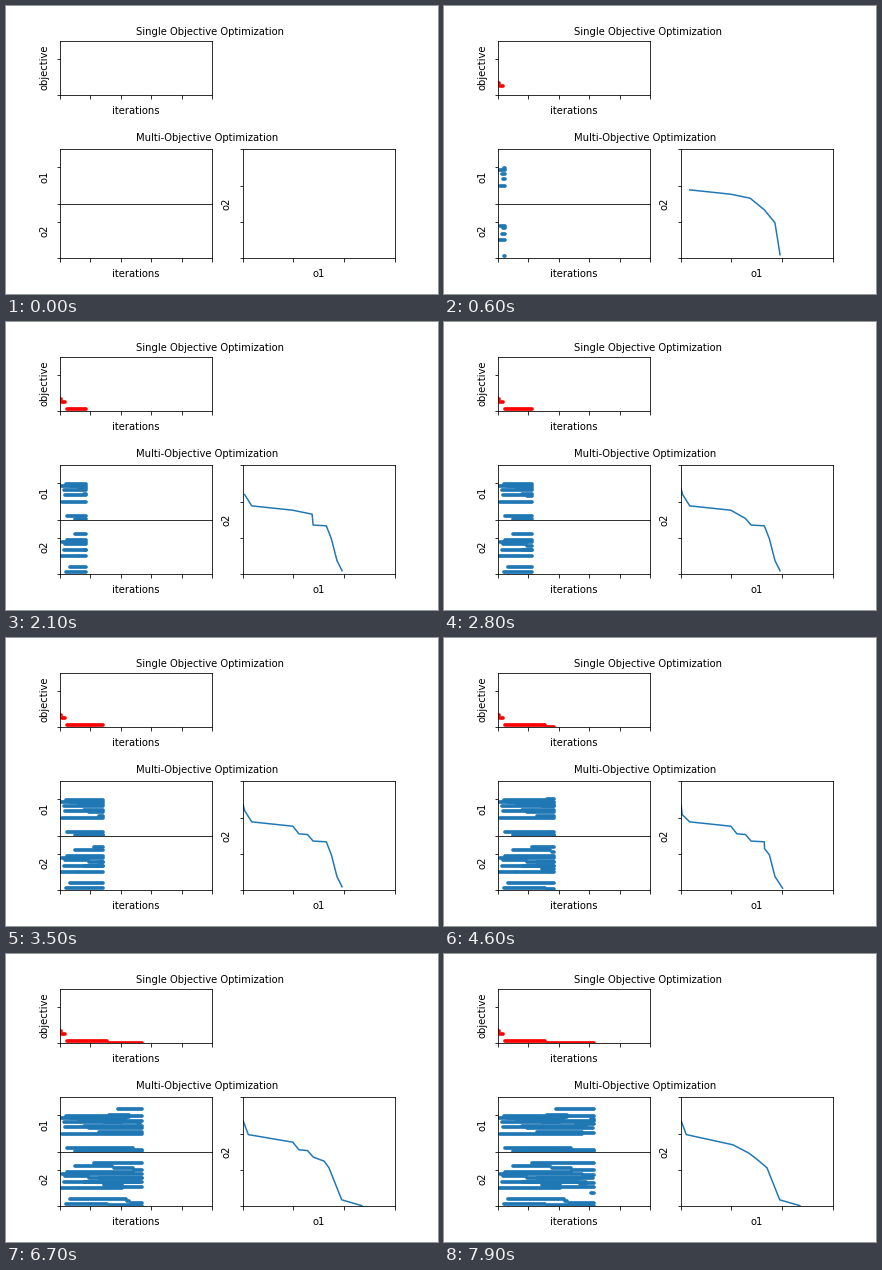
Write a matplotlib script that moves like this. It is 432 by 288 pixels and loops after 8 s.

```python
import matplotlib.pyplot as plt
from matplotlib.animation import FuncAnimation
from matplotlib.collections import LineCollection
import numpy as np

FRAMES = 80
STEPS = 125  # iterations spanned by the x axes
PAD = 11     # gap between an axis and its label, in pixels

# Key solutions (o1, o2) in order of discovery
KEYS = [(2.14, .64), (1.86, .97), (.99, 1.76), (1.65, 1.33), (1.37, 1.65),
        (1.96, .09), (.18, 1.88), (1.86, .37), (.04, 2.19), (1.75, .97),
        (1.39, 1.35), (1.28, 1.53), (.01, 2.35), (1.11, 1.55), (1.655, 1.14),
        (2.01, .05), (.03, 2.08), (2.35, .01)]
KEY_STEPS = np.r_[0:7, 8:50:4]
BLEND_STEPS = range(52, FRAMES, 3)

# Single objective: start of each level and its value
LEVELS = [(0, .67), (2, .5), (5, .2), (6, .11), (40, .02)]


def evolve(seed=4):
    """Rows (o1, o2, birth, death); a new solution displaces close ones."""
    rng = np.random.default_rng(seed)
    archive = []

    def add(point, step):
        radius = .16 + .3 / max(step, 1) ** 2
        for row in archive:
            if row[3] == FRAMES and np.hypot(*np.subtract(row[:2], point)) < radius:
                row[3] = step
        archive.append([*point, step, FRAMES])

    for point, step in zip(KEYS, KEY_STEPS):
        add(point, step)
    for step in BLEND_STEPS:
        alive = sorted(row[:2] for row in archive if row[3] == FRAMES)
        i = rng.integers(1, len(alive) - 2)
        mix = rng.uniform(.3, .7)
        add(mix * np.array(alive[i]) + (1 - mix) * np.array(alive[i + 1]), step)
    archive = np.array(archive)
    return archive[np.argsort(archive[:, 0])]


def bars(values, births, deaths, step):
    """Horizontal segments for everything that has appeared so far."""
    return [[(b, v), (min(step, d - 1) + .01, v)]
            for v, b, d in zip(values, births, deaths) if b <= step]


o1, o2, birth, death = evolve().T
level_starts, level_values = zip(*LEVELS)
level_ends = level_starts[1:] + (FRAMES,)

plt.rcParams.update({"font.family": "DejaVu Sans", "font.size": 10,
                     "text.kerning_factor": 6})
fig = plt.figure(figsize=(6, 4), dpi=72, facecolor="white")
fig.subplots_adjust(left=.125, right=.9, top=.88, bottom=.125)
grid = fig.add_gridspec(4, 2, hspace=0, wspace=.2)


def make_axes(cell, xmax, xticks, yticks, xlabel, ylabel):
    ax = fig.add_subplot(cell)
    ax.set(xlim=(0, xmax), ylim=(0, 3), xticks=xticks, yticks=yticks)
    ax.tick_params(labelbottom=False, labelleft=False)
    style = dict(xycoords="axes fraction", textcoords="offset points",
                 ha="center", annotation_clip=False)
    ax.annotate(xlabel, (.5, 0), (0, -PAD), va="top", **style)
    ax.annotate(ylabel, (0, .5), (-PAD, 0), va="bottom", rotation=90,
                rotation_mode="anchor", **style)
    return ax


def make_bars(ax, color):
    return ax.add_collection(LineCollection([], colors=color, linewidths=3.7,
                                            capstyle="round"), autolim=False)


ticks = range(0, STEPS + 1, 25)
ax_single = make_axes(grid[0, 0], STEPS, ticks, (0, 2), "iterations", "objective")
ax_o1 = make_axes(grid[2, 0], STEPS, (), (0, 2), "", "o1")
ax_o2 = make_axes(grid[3, 0], STEPS, ticks, (0, 2), "iterations", "o2")
ax_front = make_axes(grid[2:, 1], 3, range(4), range(4), "o1", "o2")

fig.text(.3, .9, "Single Objective Optimization")
fig.text(.3, .53, "Multi-Objective Optimization")

single = make_bars(ax_single, "red")
bars_o1 = make_bars(ax_o1, "C0")
bars_o2 = make_bars(ax_o2, "C0")
curve, = ax_front.plot([], [], color="C0")


def update(step):
    single.set_segments(bars(level_values, level_starts, level_ends, step))
    bars_o1.set_segments(bars(o1, birth, death, step))
    bars_o2.set_segments(bars(o2, birth, death, step))
    alive = (birth <= step) & (step < death)
    curve.set_data(o1[alive], o2[alive])
    return single, bars_o1, bars_o2, curve


anim = FuncAnimation(fig, update, frames=FRAMES, interval=100,
                     repeat=True, repeat_delay=0)
plt.show()
```
